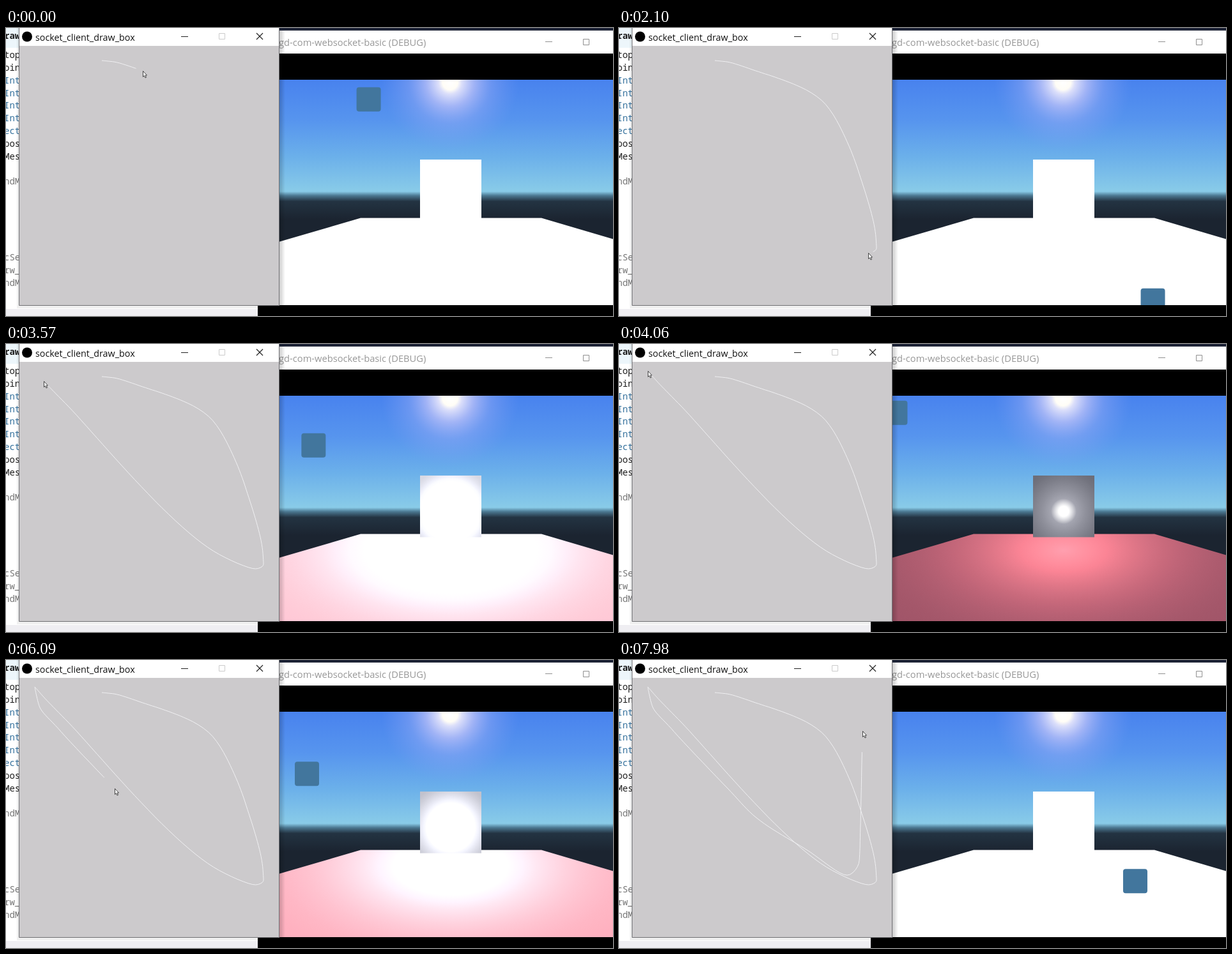
These frames come from a looping animation (950 by 451 pixels, 8 s). An HTML page:

```html
<!DOCTYPE html>
<html lang="en">
<head>
<meta charset="utf-8">
<title>Socket drawing</title>
<style>
html, body { margin: 0; width: 100%; height: 100%; overflow: hidden; background: #fff; }
svg { display: block; width: 950px; height: 451px; }
.code { font: 14px "Noto Sans Mono", monospace; }
.title { font-family: "Open Sans", sans-serif; }
</style>
</head>
<body>
<svg viewBox="0 0 950 451">
  <defs>
    <linearGradient id="sky" gradientUnits="userSpaceOnUse" x1="0" y1="80" x2="0" y2="300">
      <stop offset="0" stop-color="#4882ee"/>
      <stop offset=".3" stop-color="#5795ee"/>
      <stop offset=".55" stop-color="#6bb0ea"/>
      <stop offset=".8" stop-color="#89cbe8"/>
      <stop offset=".83" stop-color="#4b7790"/>
      <stop offset=".87" stop-color="#233342"/>
      <stop offset="1" stop-color="#1b2430"/>
    </linearGradient>
    <radialGradient id="sun" gradientUnits="userSpaceOnUse" cx="695" cy="85" r="108">
      <stop offset="0" stop-color="#fff"/>
      <stop offset=".11" stop-color="#fffdf6"/>
      <stop offset=".17" stop-color="#dcdffa"/>
      <stop offset=".35" stop-color="#b0bbf7" stop-opacity=".85"/>
      <stop offset=".6" stop-color="#92a9f5" stop-opacity=".45"/>
      <stop offset="1" stop-color="#7a9df2" stop-opacity="0"/>
    </radialGradient>
    <radialGradient id="glint">
      <stop offset=".4" stop-color="#fff"/>
      <stop offset="1" stop-color="#fff" stop-opacity="0"/>
    </radialGradient>
    <radialGradient id="floorLight" gradientUnits="userSpaceOnUse" cx="0" cy="0" r="1" gradientTransform="translate(696 323) scale(360 180)"/>
    <radialGradient id="cubeLight" gradientUnits="userSpaceOnUse" cx="696" cy="262" r="68"/>
    <linearGradient id="shade">
      <stop offset="0" stop-opacity=".2"/>
      <stop offset="1" stop-opacity="0"/>
    </linearGradient>
    <clipPath id="view"><path d="M394 81H950V434H394Z"/></clipPath>
  </defs>

  <path fill="#fff" d="M0 0H950V451H0Z"/>
  <path fill="#edf6fb" d="M0 0H21V31H0Z"/>
  <path fill="#efeef2" d="M0 440H394V451H0Z"/>
  <g id="code" class="code"></g>

  <path fill="#1c2235" d="M394 0H950V4H394Z"/>
  <path fill="#fff" d="M394 4H950V40H394Z"/>
  <text class="title" x="427" y="28" font-size="14.7" fill="#979797">gd-com-websocket-basic (DEBUG)</text>
  <path fill="none" stroke="#909090" d="M844 21.5H855M903.5 17.5H912.5V26.5H903.5Z"/>
  <path d="M394 40H950V451H394Z"/>
  <g clip-path="url(#view)">
    <path fill="url(#sky)" d="M394 80H950V434H394Z"/>
    <circle cx="695" cy="85" r="108" fill="url(#sun)"/>
    <path fill="url(#floorLight)" d="M555 297.5H838L950 330.5V434H394V344.5Z"/>
    <path fill="url(#cubeLight)" d="M648 206H744V302.5H648Z"/>
    <circle cx="696" cy="262" r="20" fill="url(#glint)"/>
    <rect id="sprite" x="-19" y="-19" width="38" height="38" rx="4" fill="#42769d"/>
  </g>

  <path fill="url(#shade)" d="M428 4H437V440H428Z"/>
  <path opacity=".06" d="M17 0H21V435H428V439H17Z"/>
  <path fill="#cccacc" d="M21 0H428V435H21Z"/>
  <path fill="#fff" d="M21 0H428V28H21Z"/>
  <path fill="none" stroke="#707074" d="M20.5 0V434.5H427.5V0"/>
  <circle cx="33" cy="13.5" r="8"/>
  <text class="title" x="46" y="20" font-size="14.3" fill="#111">socket_client_draw_box</text>
  <path fill="none" stroke="#222" d="M274 13.5H285"/>
  <path fill="none" stroke="#ccc" d="M333.5 8.5H342.5V17.5H333.5Z"/>
  <path fill="none" stroke="#222" stroke-width="1.2" d="M392 8L402 18M402 8L392 18"/>
  <path id="trail" fill="none" stroke="#f0f0f2"/>
  <path id="cursor" fill="#fff" stroke="#333" stroke-width=".9" d="M.5 .5V9.5L2.5 7.6L4 11L5.5 10.3L4.1 7H6.5Z"/>
</svg>
<script>
const $ = id => document.getElementById(id);
const LOOP = 8000, STEP = 70, LAG = 330;

function add(parent, tag, attrs) {
  const el = document.createElementNS('http://www.w3.org/2000/svg', tag);
  for (const k in attrs) el.setAttribute(k, attrs[k]);
  return parent.appendChild(el);
}

// Editor text peeking out behind the windows, one word per line
const DARK = '#1c1c1c', BLUE = '#33709c', GREY = '#777';
const inkOf = word => /Int|ect/.test(word) ? BLUE : /ndM|cSe|rw_/.test(word) ? GREY : DARK;
'raw,top,oin,Int,Int,Int,Int,ect,pos,Mes,,ndM,,,,,,cSe,rw_,ndM'.split(',').forEach((word, i) => {
  const line = { x: -3, y: 27.3 + 19.8 * i, fill: inkOf(word) };
  if (!i) Object.assign(line, { y: 17, 'font-weight': 700 });
  add($('code'), 'text', line).textContent = word;
});

// Mouse gesture: [time, x, y] at its turns and pauses
const keys = [
  [-600, 150, 51], [-330, 169, 53], [0, 214, 67], [440, 283, 92], [600, 319, 115], [770, 345, 153],
  [1150, 374, 222], [1770, 402, 327], [1930, 403, 345], [2100, 390, 352], [2350, 331, 328],
  [3240, 94, 94], [3570, 59, 58], [4000, 45, 42], [5000, 45, 42], [5400, 52, 72], [5760, 85, 111],
  [6090, 170, 201], [6400, 215, 247], [6800, 295, 298], [7100, 357, 337], [7300, 376, 315],
  [7650, 378, 257], [7980, 381, 111]
];

// Monotone cubic, so the gesture never overshoots a key
function slope(i, k) {
  const a = keys[i], b = keys[i + 1];
  return a && b ? (b[k] - a[k]) / (b[0] - a[0]) : null;
}
function tangent(i, k) {
  const a = slope(i - 1, k) ?? slope(i, k), b = slope(i, k) ?? a;
  return a * b > 0 ? 2 * a * b / (a + b) : 0;
}
function pointAt(t) {
  let i = 0;
  while (i < keys.length - 2 && t > keys[i + 1][0]) i++;
  const h = keys[i + 1][0] - keys[i][0];
  const u = Math.max(0, Math.min(1, (t - keys[i][0]) / h)), v = 1 - u;
  return [1, 2].map(k =>
    keys[i][k] * v * v * (1 + 2 * u) + keys[i + 1][k] * u * u * (3 - 2 * u) +
    h * u * v * (v * tangent(i, k) - u * tangent(i + 1, k)));
}

function trailTo(end) {
  const line = [];
  for (let t = keys[0][0]; t < end; t += STEP / 2) line.push(pointAt(t));
  line.push(pointAt(end));
  return 'M' + line.map(p => p.map(c => c.toFixed(1))).join('L');
}

// Lit surface: ambient plus lamp colour times falloff, clipped to white
function light(id, ambient, lamp, falloff) {
  const n = 16;
  const stops = Array.from({ length: n + 1 }, (_, i) => add($(id), 'stop', { offset: i / n }));
  return energy => stops.forEach((stop, i) => {
    const f = energy * falloff(1 - i / n);
    const rgb = ambient.map((a, k) => Math.round(Math.min(255, a + lamp[k] * f)));
    stop.setAttribute('stop-color', `rgb(${rgb})`);
  });
}
const lightFloor = light('floorLight', [2, 3, 27], [5.2, 2.7, 2.55], q => 1 + .9 * q ** 2.2);
const lightCube = light('cubeLight', [33, 34, 45], [2.5, 2.5, 2.5], q => 1 + 1.1 * q ** 1.25);

const move = (id, x, y) => $(id).setAttribute('transform', `translate(${x.toFixed(2)} ${y.toFixed(2)})`);

function draw(time) {
  const t = Math.floor(time % LOOP / STEP) * STEP;
  move('cursor', ...pointAt(t));
  $('trail').setAttribute('d', trailTo(t - STEP));

  // Sprite and lamp follow the mouse late, as received over the socket
  const [x, y] = pointAt(t - LAG);
  move('sprite', 425 + (x - 45) * 1.15, 99 + (y - 42) * 1.15);
  lightFloor(x - 21);
  lightCube(x - 21);
}

const start = performance.now();
function tick() {
  draw(performance.now() - start);
  requestAnimationFrame(tick);
}
tick();
</script>
</body>
</html>
```
